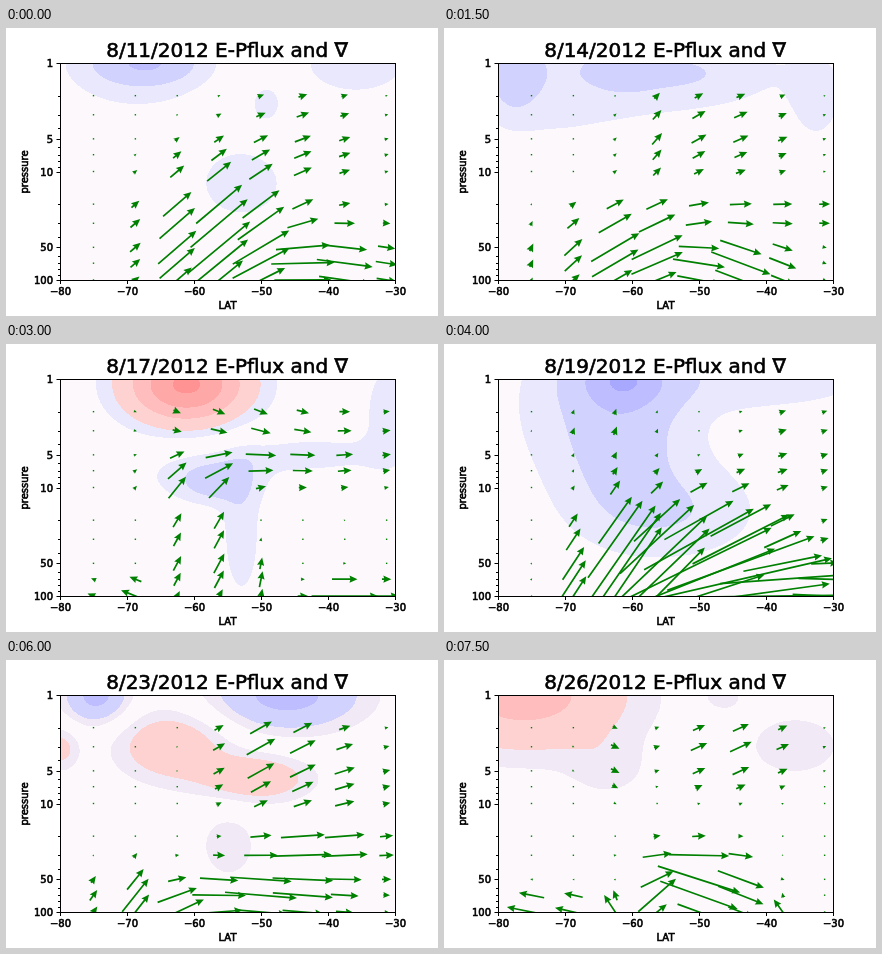
An HTML page with a canvas for the animation above (8 s loop, 432x288 px).

```html
<!DOCTYPE html>
<html>
<head>
<meta charset="utf-8">
<style>
html, body { margin: 0; width: 432px; height: 288px; overflow: hidden; background: #fff; }
canvas { display: block; }
</style>
</head>
<body>
<canvas width="432" height="288"></canvas>
<script>
const ctx = document.querySelector('canvas').getContext('2d');
const LEFT = 54, TOP = 35, RIGHT = 389, BOTTOM = 252, W = RIGHT - LEFT, H = BOTTOM - TOP;
const LEVELS = [2, 3, 5, 7, 10, 20, 30, 50, 70, 100];
const MAJOR = [1, 5, 10, 50, 100];

const xOf = lat => LEFT + (lat + 80) * 6.7;
const yOf = p => TOP + Math.log10(p) * 108.5;
const mix = (a, b, t) => a + (b - a) * t;

// Everything is a sum of Gaussian lobes: x, y, width, height, then
// a strength (heat: warm > 0, cool < 0) or east and up lengths (wind).
const days = [
  { day: 0,
    heat: [[130,35,85,52,-.9], [140,35,45,18,-1.3], [350,35,65,38,-.8], [235,155,55,45,-.75], [260,76,14,17,-.75]],
    wind: [[215,215,65,70,60,52], [320,240,60,40,60,-10], [300,120,70,70,15,5]] },
  { day: 3,
    heat: [[100,45,115,78,-.8], [250,45,100,38,-.9], [372,70,27,45,-.8], [70,45,22,35,-.9], [180,35,30,28,-.3]],
    wind: [[190,225,55,45,54,32], [290,240,55,30,60,-24], [280,105,80,50,16,7],
           [215,110,35,50,2,8], [310,185,90,25,22,0], [110,225,35,40,3,10]] },
  { day: 6,
    heat: [[180,40,62,40,4.2], [200,130,65,30,-.9], [235,190,22,75,-.8], [310,110,70,18,-.8],
           [380,70,25,60,-.8], [205,140,28,18,-.6]],
    wind: [[255,115,75,25,28,-2], [190,140,45,30,16,22], [195,215,28,60,16,30], [240,75,90,25,14,-6],
           [345,255,35,20,70,0], [115,252,25,18,-40,16], [350,100,60,60,9,2], [255,240,14,35,3,16]] },
  { day: 8,
    heat: [[165,60,115,110,-.9], [230,170,95,50,-.8], [175,80,50,75,-.7], [180,35,45,28,-1.8], [340,35,100,30,-.8]],
    wind: [[180,250,45,70,90,140], [270,215,60,50,130,70], [320,250,70,30,130,-10],
           [350,110,60,80,9,3], [160,85,60,30,3,8]] },
  { day: 10,
    heat: [[54,35,43,50,-6.5], [300,40,150,28,-.75], [180,100,48,115,-.75], [105,205,45,45,-.75]],
    wind: [[140,235,45,60,60,70], [190,165,45,45,50,35], [310,220,90,60,190,0], [250,110,60,25,35,8],
           [260,68,75,20,24,8], [240,250,60,50,60,40], [290,235,50,20,30,-70]] },
  { day: 12,
    heat: [[90,35,32,28,-2.4], [54,88,18,22,1.3], [165,85,56,36,1.8], [250,118,55,24,1.8],
           [280,35,75,35,-2.4], [222,185,35,42,-.75]],
    wind: [[265,95,55,50,30,17], [340,120,45,60,16,4], [310,190,60,30,50,2], [260,235,75,30,70,-6],
           [125,245,35,35,24,36], [180,252,30,20,40,22]] },
  { day: 15,
    heat: [[80,35,110,58,2.4], [165,110,40,30,.6], [275,35,28,20,-.75], [350,85,62,40,-.75]],
    wind: [[290,90,65,40,22,10], [165,100,30,40,9,-5], [245,197,45,18,38,9], [265,228,42,30,85,-34],
           [213,235,25,20,20,40], [105,250,30,18,-70,14], [165,252,20,14,-25,36], [339,252,18,14,-20,26]] }
];

// Sum of lobes at a point; k picks which strength to add up
function sum(lobes, x, y, k) {
  let total = 0;
  for (const lobe of lobes)
    total += lobe[k] * Math.exp(-(((x - lobe[0]) / lobe[2]) ** 2) - ((y - lobe[1]) / lobe[3]) ** 2);
  return total;
}

function bandColor(v, day) {
  const size = Math.abs(v);
  if (size < .5) return [252, 248, 252];
  if (size < 1) return day < 9 ? [233, 232, 253] : [241, 233, 245];
  const c = 231 - 21 * Math.floor(size);
  return v < 0 ? [c, c, 255] : [255, c, c];
}

function drawHeat(value, day) {
  const image = ctx.createImageData(W, H);
  for (let i = 0; i < W * H; i++) {
    const v = value(LEFT + i % W, TOP + Math.floor(i / W));
    image.data.set([...bandColor(v, day), 255], i * 4);
  }
  ctx.putImageData(image, LEFT, TOP);
}

// Arrow centred on (x, y); short ones shrink as a whole, the tiniest become dots
function arrow(x, y, dx, dy) {
  const len = Math.hypot(dx, dy), s = Math.min(1, len / 8);
  ctx.save();
  ctx.translate(x, y);
  ctx.fillStyle = '#008000';
  if (len < 1.7) {
    ctx.fillRect(-.7, -.7, 1.4, 1.4);
  } else {
    ctx.rotate(Math.atan2(-dy, dx));
    const tip = len / 2, neck = tip - 7.2 * s, barb = tip - 8 * s, w = .85 * s, h = 3.6 * s;
    ctx.beginPath();
    for (const [px, py] of [[-tip, -w], [neck, -w], [barb, -h], [tip, 0], [barb, h], [neck, w], [-tip, w]])
      ctx.lineTo(px, py);
    ctx.fill();
  }
  ctx.restore();
}

function label(text, x, y, size = 10, align = 'center') {
  ctx.font = size + 'px "DejaVu Sans", sans-serif';
  ctx.textAlign = align;
  ctx.fillText(text, x, y);
  ctx.strokeText(text, x, y);
}

function line(x1, y1, x2, y2) {
  ctx.beginPath();
  ctx.moveTo(x1, y1);
  ctx.lineTo(x2, y2);
  ctx.stroke();
}

function drawAxes(day) {
  ctx.fillStyle = ctx.strokeStyle = '#000';
  ctx.lineWidth = 1;
  ctx.strokeRect(LEFT + .5, TOP + .5, W, H);
  for (let p = 1; p <= 100; p += p < 10 ? 1 : 10) {
    const y = Math.round(yOf(p)) + .5;
    line(LEFT - (MAJOR.includes(p) ? 3.5 : 2), y, LEFT, y);
  }
  for (let lat = -80; lat <= -30; lat += 10) {
    const x = Math.round(xOf(lat)) + .5;
    ctx.lineWidth = 1;
    line(x, BOTTOM, x, BOTTOM + 4);
    ctx.lineWidth = .6;
    label('\u2212' + -lat, x, 267);
  }
  for (const p of MAJOR) label(p, 47, yOf(p) + 4, 10, 'right');
  label('LAT', 221.5, 281);
  label(`8/${11 + day}/2012 E-Pflux and \u2207`, 221, 29, 20);
  ctx.save();
  ctx.translate(22, 144);
  ctx.rotate(-Math.PI / 2);
  label('pressure', 0, 0);
  ctx.restore();
}

function draw(day) {
  const n = Math.max(1, days.findIndex(d => d.day >= day));
  const a = days[n - 1], b = days[n], t = (day - a.day) / (b.day - a.day);
  const blend = (kind, k) => (x, y) => mix(sum(a[kind], x, y, k), sum(b[kind], x, y, k), t);
  const east = blend('wind', 4), up = blend('wind', 5);

  ctx.fillStyle = '#fff';
  ctx.fillRect(0, 0, 432, 288);
  drawHeat(blend('heat', 4), day);
  ctx.save();
  ctx.beginPath();
  ctx.rect(LEFT, TOP, W, H);
  ctx.clip();
  for (const p of LEVELS)
    for (let lat = -75; lat < -30; lat += 6.25) {
      const x = xOf(lat), y = yOf(p);
      arrow(x, y, east(x, y), up(x, y));
    }
  ctx.restore();
  drawAxes(day);
}

let shown = -1;
function tick() {
  const day = Math.floor(performance.now() % 8000 / 500);
  if (day !== shown) draw(shown = day);
  requestAnimationFrame(tick);
}
tick();
</script>
</body>
</html>
```
